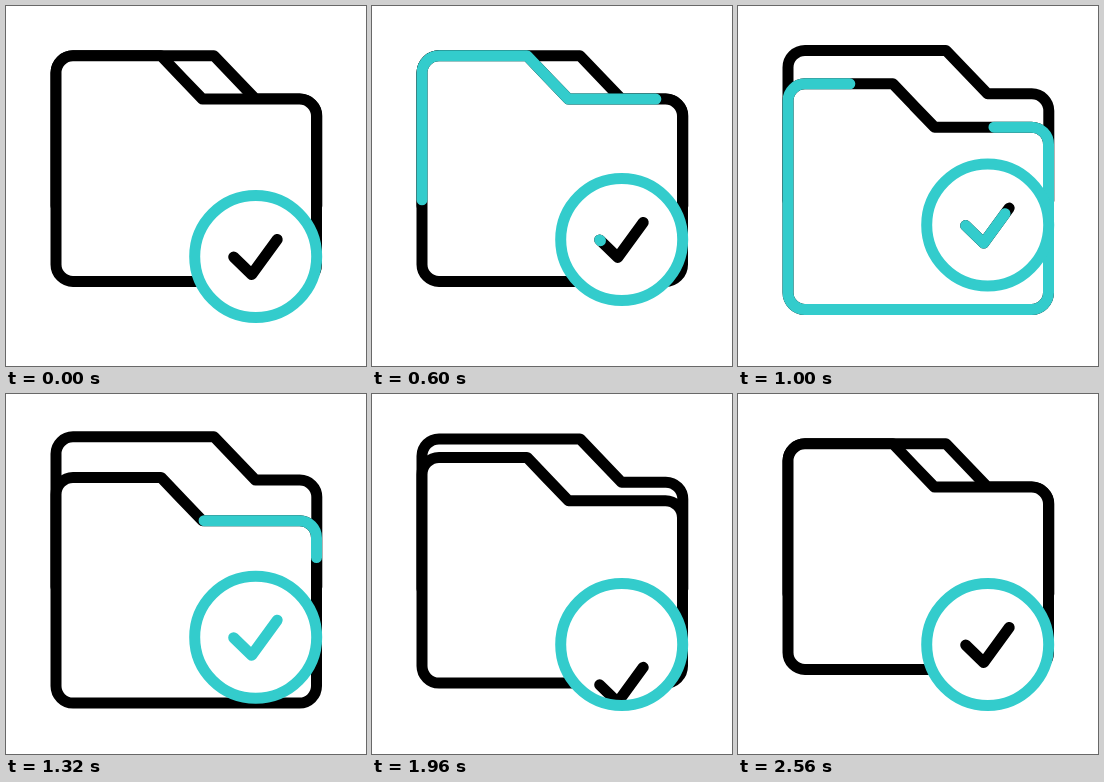
Animation of 360x360 px, one loop 3000 ms. Source, as an HTML page with a canvas:

```html
<!DOCTYPE html>
<html lang="en">
<head>
<meta charset="utf-8">
<title>Folder check</title>
<style>
  html, body { margin: 0; width: 100%; height: 100%; overflow: hidden; background: #fff; }
  canvas { display: block; width: 360px; height: 360px; }
</style>
</head>
<body>
<canvas id="stage" width="360" height="360"></canvas>
<script>
const ctx = document.getElementById('stage').getContext('2d');
const LOOP = 3000;
const BLACK = '#000';
const TEAL = '#33cccc';

// Both outlines run counter-clockwise.
const FRONT = 'M175.7 71.5L155 49.8H67A17 17 0 0 0 50 66.8V258.4A17 17 0 0 0 67 275.4' +
  'H293.5A17 17 0 0 0 310.5 258.4V110.1A17 17 0 0 0 293.5 93.1H196.5Z';
const BACK = 'M310.8 200V110.1A17 17 0 0 0 293.8 93.1H249.5L208 49.8H67A17 17 0 0 0 50 66.8V200';
const CHECK = 'M-22 0.5L-4 18L21.5 -17';

// The dash period of an open path is doubled so that its pattern never wraps.
function shape(d) {
  const el = document.createElementNS('http://www.w3.org/2000/svg', 'path');
  el.setAttribute('d', d);
  const length = el.getTotalLength();
  return { path: new Path2D(d), length, period: d.endsWith('Z') ? length : length * 2 };
}
const front = shape(FRONT);
const back = shape(BACK);
const check = shape(CHECK);

// Eased progress between two times; x1 and x2 shape the start and the end.
function ease(t, from, to, x1 = 0.33, x2 = 0.67) {
  const x = (t - from) / (to - from);
  if (x <= 0) return 0;
  if (x >= 1) return 1;
  let lo = 0, hi = 1;
  for (let i = 0; i < 24; i++) {
    const u = (lo + hi) / 2, v = 1 - u;
    if (3 * u * v * v * x1 + 3 * u * u * v * x2 + u * u * u < x) lo = u;
    else hi = u;
  }
  return lo * lo * (3 - 2 * lo);
}

function stroke(s, color) {
  ctx.strokeStyle = color;
  ctx.stroke(s.path);
}

function strokePart(s, from, to, color) {
  const size = to - from;
  if (size < 0.3) return;
  ctx.setLineDash([size, Math.max(0, s.period - size)]);
  ctx.lineDashOffset = -from;
  stroke(s, color);
  ctx.setLineDash([]);
}

function at(x, y, paint) {
  ctx.save();
  ctx.translate(x, y);
  paint();
  ctx.restore();
}

function drawFront(t) {
  ctx.fillStyle = '#fff';
  ctx.fill(front.path);
  stroke(front, BLACK);
  const lead = ease(t, 246, 1120, 0.42, 0.43);
  const trail = ease(t, 560, 1760, 0.75, 0.25);
  const origin = 6 - front.length + 0.12 * (t - 1640);
  strokePart(front, origin + front.length * trail, origin + front.length * lead, TEAL);
}

function drawBadge(t) {
  ctx.beginPath();
  ctx.arc(0, 0, 61, 0, Math.PI * 2);
  ctx.fillStyle = '#fff';
  ctx.fill();

  ctx.save();
  ctx.clip();
  const gap = 120;
  const shift = -gap * ease(t, 1596, 2190);
  at(0, shift, () => {
    const filled = ease(t, 560, 1110);
    if (filled < 1) stroke(check, BLACK);
    strokePart(check, 0, check.length * filled, TEAL);
  });
  at(0, shift + gap, () => stroke(check, BLACK));
  ctx.restore();

  ctx.beginPath();
  ctx.arc(0, 0, 61, 0, Math.PI * 2);
  ctx.strokeStyle = TEAL;
  ctx.stroke();
}

function draw(t) {
  const frontY = 33.6 * (ease(t, 680, 1240, 0.33, 0.27) - ease(t, 1600, 2480, 0.33, 0.3));
  const backY = -7 * (ease(t, 760, 1240, 0.33, 0.27) - ease(t, 1740, 2560, 0.33, 0.3));
  const badgeY = -34 * (ease(t, 300, 900) - ease(t, 900, 1500));

  ctx.fillStyle = '#fff';
  ctx.fillRect(0, 0, 360, 360);
  ctx.lineWidth = 11;
  ctx.lineCap = ctx.lineJoin = 'round';
  at(0, backY, () => stroke(back, BLACK));
  at(0, frontY, () => drawFront(t));
  at(249.7, 250.5 + badgeY, () => drawBadge(t));
}

const start = performance.now();
function tick() {
  draw((performance.now() - start) % LOOP);
  requestAnimationFrame(tick);
}
tick();
</script>
</body>
</html>
```
